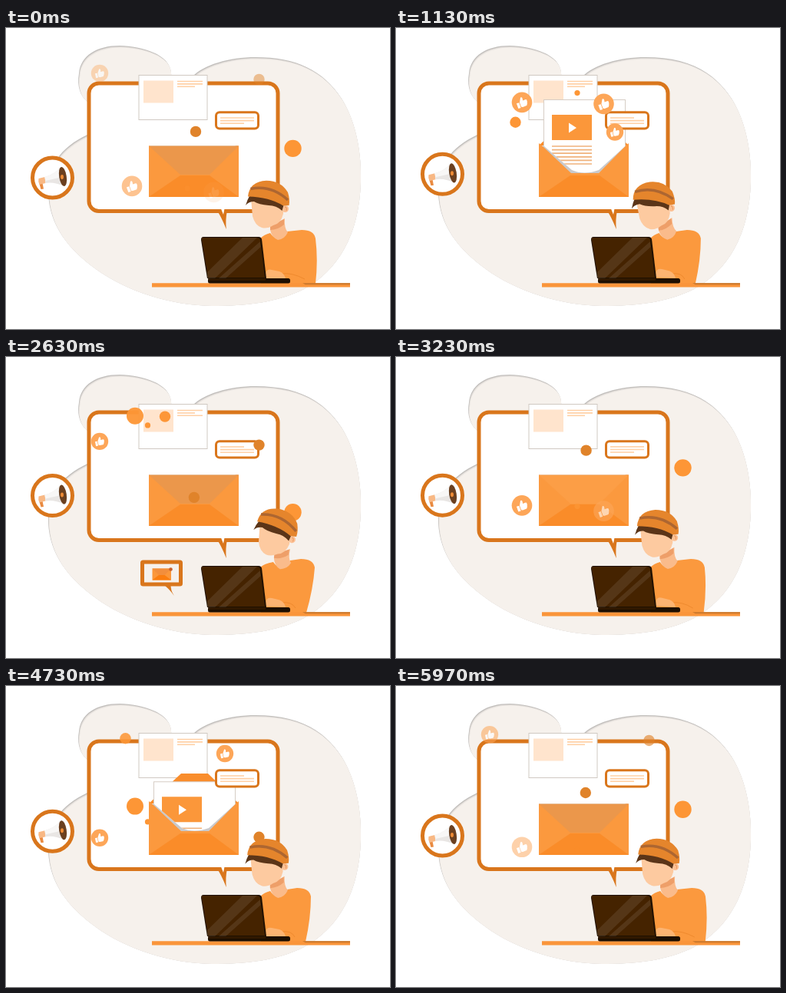
Animation, 500 px wide and 392 px high, one loop 6.01 s. Source, as an HTML page:

```html
<!DOCTYPE html>
<html lang="en">
<head>
<meta charset="utf-8">
<title>Email campaign</title>
<style>
html, body { margin: 0; width: 100%; height: 100%; overflow: hidden; background: #fff; }
svg { display: block; width: 100vw; height: 100vh; }
</style>
</head>
<body>
<svg viewBox="0 0 500 392">
  <defs>
    <path id="blob" d="M106 96C97 89 92 76 95 59C97 36 118 23 148 23C178 24 213 34 215 58L216 76H238L243 63C258 48 290 38 325 38C378 38 413 55 437 92C457 124 463 165 462 200C460 270 432 316 388 340C352 358 312 362 268 362C214 361 157 343 117 314C81 288 57 257 55 216C54 180 70 156 106 139Z"/>
    <clipPath id="blobClip"><use href="#blob"/></clipPath>
    <clipPath id="pocket"><path d="M186 0H305V148L264 185Q245 192 229 185L186 148Z"/></clipPath>
    <clipPath id="screenClip"><path d="M257 273H330L337 326H262Z"/></clipPath>
    <g id="thumb" fill="#fff">
      <path d="M-7 -1H-3.6V6H-7Z"/>
      <path d="M-2.8 -1L.3 -6.4Q2.8 -7 2.2 -3.6L1.7 -1.8H5.8Q7.5 -1.2 6.6 .4Q7.2 1.6 6 2.4Q6.4 3.8 5.2 4.4Q5.2 6 3.6 6H-1L-2.8 5.2Z"/>
    </g>
  </defs>

  <use href="#blob" fill="#c2bfbc"/>
  <g clip-path="url(#blobClip)">
    <use href="#blob" x=".7" y="1.2" fill="#e6e1dd"/>
    <use href="#blob" x="1.500" y="2.600" fill="#f6f1ec"/>
  </g>

  <rect x="108" y="72" width="246" height="166.500" rx="13" fill="#fff" stroke="#d9761c" stroke-width="5"/>
  <path d="M274.500 237.500Q280 245 286.800 262Q285.500 250 288 237.500Z" fill="#d9761c"/>
  <path d="M280 235.500H284.500L283 243Z" fill="#fff"/>

  <rect x="173" y="61.500" width="89" height="58" fill="#fff" stroke="#d0c9c2"/>
  <rect x="179" y="68.500" width="39" height="29" fill="#ffe4cd"/>
  <g id="docLines"></g>
  <g id="backDots"></g>

  <g id="megaphone">
    <circle r="26" fill="#fff" stroke="#d9761c" stroke-width="5"/>
    <path d="M-17 8L-15 15L-11.500 14.500L-13 7Z" fill="#e98a40"/>
    <path d="M-18 1L-10 -1L-9 7L-17 9Q-19 5 -18 1Z" fill="#f8b884"/>
    <path d="M-10 -1Q2 -4 11 -14L15 11Q2 5 -9 7Z" fill="#e9e6e4"/>
    <path d="M-10 -1Q2 -4 11 -14L13 -1L-9 4Z" fill="#f8f7f6"/>
    <ellipse cx="13.500" cy="-1.500" rx="4.800" ry="12.700" transform="rotate(-9 13.500 -1.500)" fill="#6b4020"/>
    <ellipse cx="12.500" cy="-1" rx="2" ry="3" fill="#ee8b35"/>
  </g>

  <g>
    <path id="flapBack" d="M186 153L228 114H263L303 153Z" fill="#f98d2c"/>
    <path d="M186 153.500L228 190H263L303 153.500Z" fill="#c9c9cb"/>
    <g clip-path="url(#pocket)"><g id="paper">
      <rect x="192.500" y="93.500" width="106" height="130" fill="#fff" stroke="#d6cdc5"/>
      <rect x="203" y="113" width="52" height="33" fill="#fb973a"/>
      <path d="M225 123.500L235 130L225 136.500Z" fill="#fff"/>
      <path d="M203 154H255M203 158.600H255M203 163.200H255M203 167.800H255M203 172.400H255M203 177H255" stroke="#f0b27c" stroke-width="1.700"/>
    </g></g>
    <path id="pocketFront" fill="#fb993e"/>
    <path d="M186 220L227 192H265L303 220Z" fill="#fa8c29"/>
    <path id="flapFront" d="M186 153.500H303L265 191H227Z"/>
  </g>

  <rect x="273.500" y="109.700" width="55" height="21.300" rx="4.500" fill="#fff" stroke="#d9761c" stroke-width="3"/>
  <g id="cardLines"></g>

  <g id="bubble">
    <path d="M203 295Q211 300 219 311Q214 304 214.500 295Z" fill="#d9761c"/>
    <rect x="177.500" y="267" width="50" height="29" rx="1" fill="#f6f1ec" stroke="#d9761c" stroke-width="5"/>
    <rect x="190.500" y="275.500" width="24.500" height="15" fill="#fb973a"/>
    <path d="M190.500 290.500L199 284H206.500L215 290.500Z" fill="#fb7d0e"/>
    <path d="M190.500 275.500H215L206.500 284H199Z" fill="#f28e3c"/>
    <circle cx="214.500" cy="276.500" r="2.300" fill="#c75f2c"/>
  </g>

  <g id="frontDots"></g>

  <path id="body" fill="#fb993e"/>
  <g id="head">
    <path d="M344 258L363 248Q362 261 367 266Q363 275 354 276Q346 273 344 263Z" fill="#fabb8b"/>
    <path d="M344 258L362 249V256Q354 263 344 263Z" fill="#ee9f69"/>
    <circle cx="363.500" cy="235.500" r="4.500" fill="#fcc195"/>
    <path d="M319 222L361 229V242Q358 255 348 257Q340 262 333 260Q324 257 321 245Z" fill="#fdcaa0"/>
    <path d="M363 233Q366 233 365 238" fill="none" stroke="#e8975e"/>
    <path d="M318 217Q340 219 362 229L359.500 238Q352 231 342 231Q329 230 323 226Q316 226 312 231Q314 224 318 217Z" fill="#5b3518"/>
    <path d="M315 219.500Q317 200 339 198.800Q358 199 367 214Q370 224 368.500 231L361 231.500Q343 220 315 219.500Z" fill="#e5852c"/>
    <path d="M318.500 209.500Q345 204 367 224" fill="none" stroke="#ad6631" stroke-width="3.500"/>
  </g>
  <path d="M190 332.300H448V337.600H190Z" fill="#fa953a"/>
  <path d="M386 332.300H448V334.300H390Z" fill="#c9772b"/>
  <path id="sleeve" fill="none" stroke="#ef8a2e"/>
  <path id="hand" d="M338 322Q338 313 346 315L356 317Q362 319 364 326H338Z" fill="#fcb472"/>
  <path d="M257 272H329Q332 272 333 275L339 326H262L254 276Q254 272 257 272Z" fill="#1f1000"/>
  <path d="M256 273H327Q330 273 331 276L337 325H263L255 276Q254 273 256 273Z" fill="#452300"/>
  <g clip-path="url(#screenClip)" fill="#fff" opacity=".09"><path d="M309 272H328L272 326H258V322Z"/><path d="M331 278L334 283L286 326H277Z"/></g>
  <rect x="263" y="326" width="107" height="6.500" rx="2.500" fill="#1d0f00"/>
  <path d="M263 326H338V329H264Z" fill="#301800"/>
</svg>
<script>
const LOOP = 6010, SECOND = 3100, FADE = 250;
const $ = id => document.getElementById(id);
const clamp = (v, a = 0, b = 1) => Math.min(b, Math.max(a, v));
const smooth = p => p * p * (3 - 2 * p);
const ramp = (t, a, b) => smooth(clamp((t - a) / (b - a)));

// Eased interpolation through [time, value] pairs.
function track(t, keys) {
  if (t <= keys[0][0]) return keys[0][1];
  for (let i = 1; i < keys.length; i++) {
    const [a, from] = keys[i - 1], [b, to] = keys[i];
    if (t <= b) return from + (to - from) * ramp(t, a, b);
  }
  return keys[keys.length - 1][1];
}

function make(tag, attrs, parent) {
  const el = document.createElementNS('http://www.w3.org/2000/svg', tag);
  for (const k in attrs) el.setAttribute(k, attrs[k]);
  return parent.appendChild(el);
}

const ORANGE = '#fd9636', DARK = '#e0832a';
// Each rises at v px/ms, passes y on the beat and lives between the two times around it.
const floaters = [
  { x: 168, y: 30.500, v: .0986, from: -1700, to: -230, r: 11, color: ORANGE, back: true },
  { x: 207, y: 26, v: .11, from: -1600, to: -220, r: 7.2, color: ORANGE, back: true },
  { x: 184.500, y: 38, v: .1086, from: -1600, to: -190, r: 3.600, color: ORANGE, back: true },
  { x: 329.500, y: 67, v: .1015, from: -1550, to: 120, r: 7.2, color: DARK },
  { x: 373.500, y: 157, v: .0964, from: -800, to: 980, r: 11.200, color: ORANGE },
  { x: 247, y: 135, v: .102, drift: .0045, from: -800, to: 750, r: 7.2, color: DARK },
  { x: 236, y: 209, v: .11, from: -60, to: 1450, r: 3.600, color: ORANGE },
  { x: 155.500, y: 246, v: .109, from: 350, to: 1850, r: 7.2, color: ORANGE },
  { x: 122, y: 59, v: .1085, from: -1650, to: 100, r: 11.200, thumb: -12 },
  { x: 164, y: 206, v: .0965, from: -165, to: 1560, r: 13.300, thumb: -20 },
  { x: 270.500, y: 214, v: .1018, from: -30, to: 1570, r: 13.300, thumb: -20 },
  { x: 285, y: 243, v: .095, from: 480, to: 1900, r: 11.200, thumb: -12 }
];
for (const f of floaters) {
  f.el = make('g', {}, $(f.back ? 'backDots' : 'frontDots'));
  make('circle', { r: f.r, fill: f.color || '#fda658' }, f.el);
  if (f.thumb) make('use', { href: '#thumb', transform: `rotate(${f.thumb}) scale(${f.r / 13})` }, f.el);
}

function drawFloaters(t) {
  for (const f of floaters) {
    const rel = [t, t - SECOND, t - LOOP, t - LOOP - SECOND].find(r => r > f.from && r < f.to);
    const shown = rel !== undefined;
    f.el.setAttribute('opacity', shown ? clamp(Math.min(rel - f.from, f.to - rel) / FADE) : 0);
    if (shown) f.el.setAttribute('transform', `translate(${f.x + (f.drift || 0) * rel} ${f.y - f.v * rel})`);
  }
}

function lineSet(id, x, top, gap, widths) {
  const lines = widths.map(w => make('path', { d: `M${x} 0h${w}`, stroke: '#ffd0a5', 'stroke-width': 1.600 }, $(id)));
  return shift => lines.forEach((line, i) => {
    const slot = (i - shift % 3 + 3.5) % 3 - .5;
    line.setAttribute('transform', `translate(0 ${top + slot * gap})`);
    line.setAttribute('opacity', clamp(Math.min(slot + .5, 2.5 - slot) * 2));
  });
}
const docLines = lineSet('docLines', 223, 69.500, 3.4, [33, 33, 23]);
const cardLines = lineSet('cardLines', 279, 117, 3.600, [44, 44, 31]);

function drawLines(u) {
  docLines(track(u, [[2200, 0], [2500, 1], [2650, 1], [2870, 3]]));
  cardLines(track(u, [[100, 0], [450, 2], [1700, 2], [1900, 3], [2200, 3], [2500, 5], [2650, 5], [2870, 6]]));
}

function drawEnvelope(u) {
  const flap = ramp(u, 130, 350) - ramp(u, 1800, 1920);
  const rise = ramp(u, 280, 600) - ramp(u, 1450, 1810);
  const shade = 1 - ramp(u, 30, 130) + ramp(u, 1940, 2200);
  const turn = 1 - 2 * flap;
  const squash = k => `translate(0 153.5) scale(1 ${k}) translate(0 -153.5)`;
  const corner = 153.5 - 3.5 * flap;
  $('pocketFront').setAttribute('d', `M186 ${corner}L192 155L228 189H264L299 153.5L303 ${corner}V220H186Z`);
  $('flapFront').setAttribute('transform', squash(Math.max(turn, 0)));
  $('flapFront').setAttribute('fill', `rgb(${252 - 17 * shade},${158 - 7 * shade},${70 + 5 * shade})`);
  $('flapBack').setAttribute('transform', squash(Math.max(-turn, 0)));
  $('paper').setAttribute('transform', `translate(0 ${62 * (1 - rise)})`);
  $('paper').setAttribute('opacity', flap > .5 ? 1 : 0);
}

function drawMan(r) {
  const tilt = track(r, [[-1170, -1], [-470, 9], [0, 0], [500, -6], [1130, -6], [1400, -1]]);
  const shift = track(r, [[-1170, 0], [-470, 4], [0, 0], [500, -1.5], [1130, -1.5], [1400, 0]]);
  const edge = track(r, [[-1170, 398], [-470, 403], [0, 404], [500, 397.500], [1400, 398]]);
  const low = track(r, [[-1170, 390], [-470, 391], [0, 403], [500, 389], [1400, 390]]);
  $('head').setAttribute('transform', `translate(${shift} 0) rotate(${tilt} 352 268)`);
  $('body').setAttribute('d', `M331 274Q336 269 ${344 + shift} 267Q${354 + shift} 282 ${366 + shift} 265L${edge - 19} 263Q${edge - 3} 263 ${edge - 1} 274Q${(edge + low) / 2 + 3} 302 ${low} 333H332Z`);
  $('sleeve').setAttribute('d', `M358 320Q372 318 ${low - 14} 327`);
  const lift = Math.max(0, Math.sin(r / 85)) * 3;
  $('hand').setAttribute('transform', `rotate(${lift} 371 326)`);
}

function drawBubble(r) {
  const size = track(r, [[-1270, 0], [-1170, 1.06], [-1000, 1], [-330, 1], [-180, 0]]);
  $('bubble').setAttribute('transform', `translate(202 284) scale(${size}) translate(-202 -284)`);
}

function draw(t) {
  // u counts from the last beat, r from the nearest one.
  const u = t < SECOND ? t : t - SECOND;
  const r = t < 1600 ? t : t < 4500 ? t - SECOND : t - LOOP;
  drawFloaters(t);
  drawLines(u);
  drawEnvelope(u);
  drawMan(r);
  drawBubble(r);
  $('megaphone').setAttribute('transform', `translate(60.5 ${187.5 + 7.5 * Math.cos(2 * Math.PI * t / LOOP)})`);
}

function tick() {
  draw(performance.now() % LOOP);
  requestAnimationFrame(tick);
}
tick();
</script>
</body>
</html>
```
